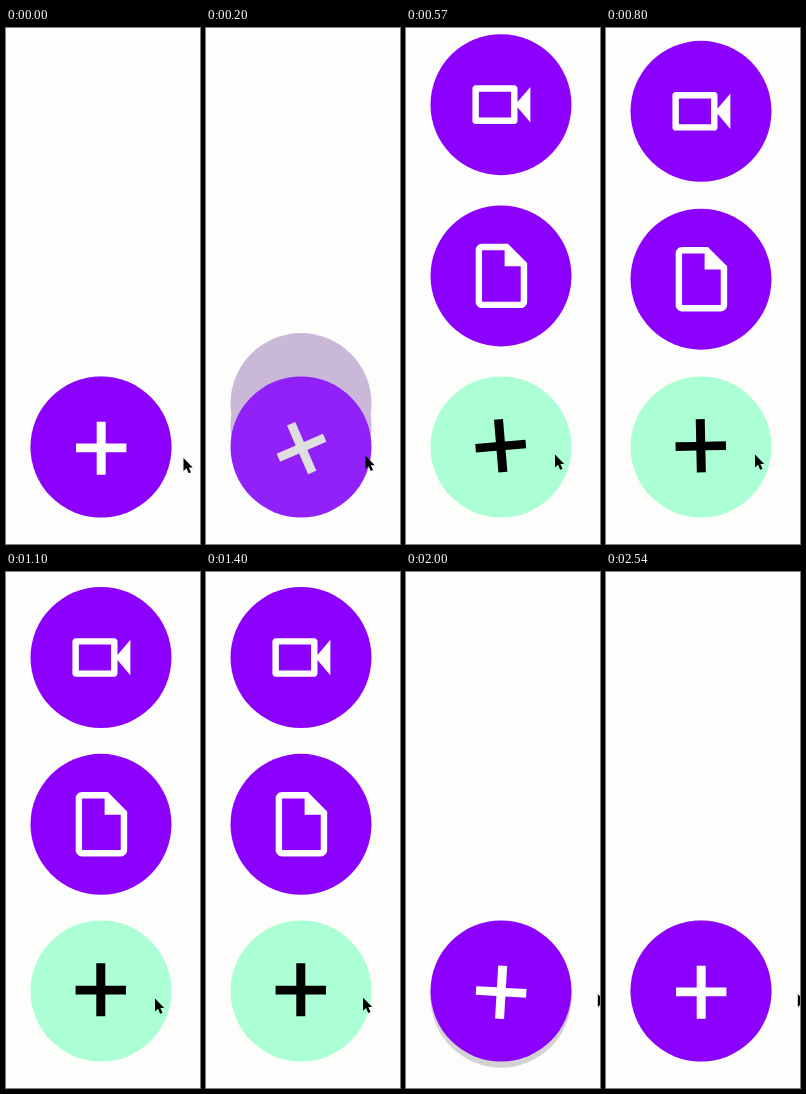
Recreate the animation shown at these times as an HTML page. Size 194 by 516 pixels, loop 2.58 s.

```html
<!DOCTYPE html>
<html lang="en">
<head>
<meta charset="utf-8">
<title>Floating action button</title>
<style>
  html, body { margin: 0; width: 100%; height: 100%; overflow: hidden; background: #fdfdfc; }
  svg { display: block; width: 194px; height: 516px; }
</style>
</head>
<body>
<svg viewBox="0 0 194 516">
  <g id="video">
    <circle r="70.5"/>
    <path transform="translate(.4) scale(3.22) translate(-12 -12)" d="M15 8v8H5V8h10m1-2H4c-.55 0-1 .45-1 1v10c0 .55.45 1 1 1h12c.55 0 1-.45 1-1v-4.2l4 4.7v-11l-4 4.7V7c0-.55-.45-1-1-1z"/>
  </g>
  <g id="file">
    <circle r="70.5"/>
    <path transform="translate(.4) scale(3.22) translate(-12 -12)" d="M14 2H6c-1.1 0-2 .9-2 2v16c0 1.1.9 2 2 2h12c1.1 0 2-.9 2-2V8l-6-6zM6 20V4h7v5h5v11H6z"/>
  </g>
  <g id="main" transform="translate(95 419)">
    <circle r="70.5"/>
    <path d="M-25 -3.4H-4.3V-25.3H4.7V-3.4H25.4V5.2H4.7V27.8H-4.3V5.2H-25z"/>
  </g>
  <path id="cursor" d="M0 0V13L3 10.3L5.2 15.3L7.5 14.3L5.3 9.4H9.2z"/>
</svg>
<script>
const LOOP = 2580, DURATION = 640, OPEN = 184, CLOSE = 1433, HOME = 419;
const VIOLET = [140, 0, 253], MINT = [172, 255, 212], GREY = [211, 211, 211];
const WHITE = [255, 255, 255], BLACK = [0, 0, 0];

const $ = id => document.getElementById(id);
const clamp = v => Math.min(1, Math.max(0, v));
const lerp = (a, b, k) => a + (b - a) * k;
const mix = (a, b, k) => `rgb(${a.map((c, i) => Math.round(lerp(c, b[i], clamp(k))))})`;

// cubic-bezier(.175, .885, .32, 1.13), solved by bisection
const bezier = (a, b, u) => 3 * (1 - u) ** 2 * u * a + 3 * (1 - u) * u * u * b + u ** 3;
function ease(x) {
  if (x <= 0 || x >= 1) return clamp(x);
  let lo = 0, hi = 1;
  for (let i = 0; i < 24; i++) {
    const mid = (lo + hi) / 2;
    if (bezier(.175, .32, mid) < x) lo = mid; else hi = mid;
  }
  return bezier(.885, 1.13, lo);
}

function smooth(t, from, to) {
  const k = clamp((t - from) / (to - from));
  return k * k * (3 - 2 * k);
}

function placeSub(id, lift, p) {
  const g = $(id), [disc, icon] = g.children;
  g.setAttribute('transform', `translate(95 ${HOME - lift * p})`);
  disc.setAttribute('fill', mix(GREY, VIOLET, p));
  icon.setAttribute('fill', mix(BLACK, WHITE, p));
  icon.setAttribute('opacity', smooth(p, .26, .76));
}

function draw(t) {
  const p = ease((t - OPEN) / DURATION) - ease((t - CLOSE) / DURATION);
  placeSub('video', 333.5, p);
  placeSub('file', 166.7, p);

  const [disc, plus] = $('main').children;
  disc.setAttribute('fill', mix(VIOLET, MINT, p));
  plus.setAttribute('fill', mix(WHITE, BLACK, p));
  plus.setAttribute('transform', `rotate(${-180 * p})`);

  const enter = smooth(t, 60, 300), leave = smooth(t, 1340, 1560);
  const x = lerp(lerp(177.5, 149, enter), 191.8, leave);
  const y = lerp(lerp(430, 426.5, enter), 422, leave);
  $('cursor').setAttribute('transform', `translate(${x} ${y})`);
}

const start = performance.now();
function tick() {
  draw((performance.now() - start) % LOOP);
  requestAnimationFrame(tick);
}
tick();
</script>
</body>
</html>
```
